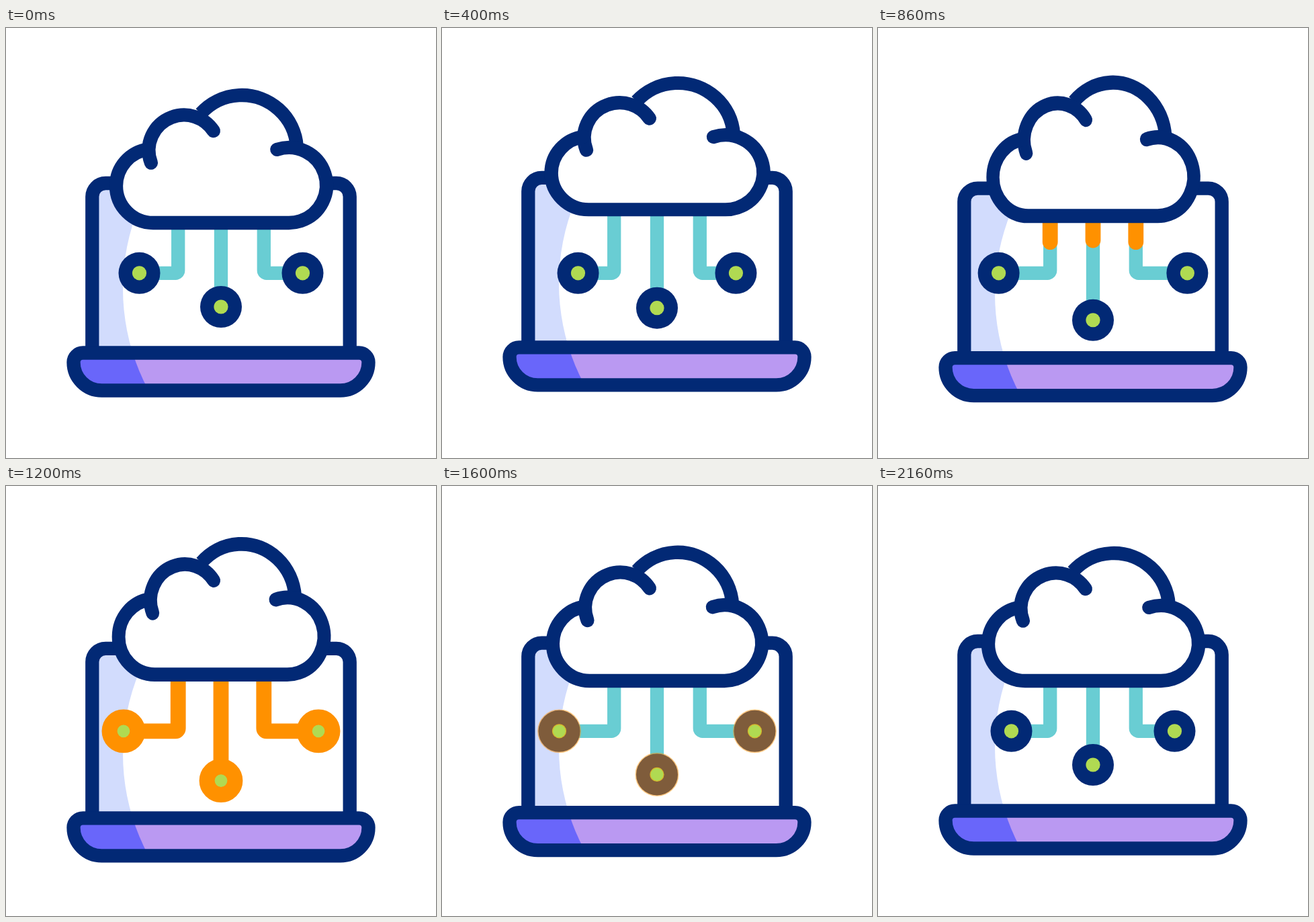
Animation, 640 px wide and 640 px high, one loop 2380 ms. Source, as an HTML page with a canvas:

```html
<!DOCTYPE html>
<html lang="en">
<head>
<meta charset="utf-8">
<title>Cloud laptop</title>
<style>
html, body { margin: 0; width: 100%; height: 100%; overflow: hidden; background: #fff; }
canvas { display: block; width: 100vmin; height: 100vmin; }
</style>
</head>
<body>
<canvas id="stage" width="640" height="640"></canvas>
<script>
const ctx = document.getElementById('stage').getContext('2d');
const LOOP = 2380;
const NAVY = '#022975', TEAL = '#69cdd3', ORANGE = '#ff9100', GREEN = '#b0da52';
const TAU = Math.PI * 2;

const linear = u => u;
const sine = u => (1 - Math.cos(Math.PI * u)) / 2;

// quick start, long settling
function settle(u) {
  let lo = 0, hi = 1;
  for (let i = 0; i < 24; i++) {
    const s = (lo + hi) / 2;
    if (0.75 * s * (1 - s) + s * s * s < u) lo = s; else hi = s;
  }
  const s = lo, r = 1 - s;
  return 0.3 * s * r * r + 3 * s * s * r + s * s * s;
}

// keys: [time, value, ease into this key]
function track(keys, t) {
  if (t <= keys[0][0]) return keys[0][1];
  for (let i = 1; i < keys.length; i++) {
    const [t0, v0] = keys[i - 1], [t1, v1, ease = sine] = keys[i];
    if (t < t1) return v0 + (v1 - v0) * ease((t - t0) / (t1 - t0));
  }
  return keys[keys.length - 1][1];
}

const LAPTOP_Y = [[0, 0], [250, -11.5], [1380, 11.2, settle], [1395, 11.2], [1890, -11.8], [2160, 0]];
const SIDE_X = [[0, 198.5], [200, 211], [1370, 174.5, settle], [1600, 174.5], [1900, 213.5], [2160, 198.5]];
const MID_Y = [[0, 415], [135, 406], [1385, 439, settle], [1440, 439], [1930, 399.5], [2160, 415]];
const CLOUD_Y = [[0, 0], [225, 0], [620, -45.5], [1010, 0], [1370, -21], [1630, 0]];
const CLOUD_SX = [[0, 1], [225, 1.047], [620, 0.955], [860, 0.955], [1200, 0.977, linear],
  [1600, 0.994, linear], [1660, 1, linear]];
const HEAD = [[740, 0], [1050, 1, linear]];
const TAIL = [[1250, 0], [1490, 1, linear]];
const GLOW = [[1020, 0], [1110, 1, linear], [1510, 1], [1690, 0, linear]];

function pen(color, width, cap = 'butt') {
  ctx.strokeStyle = color;
  ctx.lineWidth = width;
  ctx.lineCap = cap;
}

function disc(x, y, r, color) {
  ctx.fillStyle = color;
  ctx.beginPath();
  ctx.arc(x, y, r, 0, TAU);
  ctx.fill();
}

// fills a shape in two tones, parted by one large circle
function twoTone(path, left, right) {
  ctx.save();
  ctx.clip(path);
  ctx.fillStyle = left;
  ctx.fill(path);
  disc(494, 388, 320, right);
  ctx.restore();
}

const screen = new Path2D('M128.3 484 V251 A20 20 0 0 1 148.3 231 H491.7 A20 20 0 0 1 511.7 251 V484');
const base = new Path2D('M114.5 483.5 H525.5 A14 14 0 0 1 539.5 497.5 A42 42 0 0 1 497.5 539.5 ' +
  'H142.5 A42 42 0 0 1 100.5 497.5 A14 14 0 0 1 114.5 483.5 Z');

function laptop(dy) {
  ctx.save();
  ctx.translate(0, dy);
  pen(NAVY, 20.3);
  ctx.save();
  ctx.beginPath();
  ctx.rect(0, 0, 500, 640);
  ctx.clip();
  twoTone(screen, '#d2dcfd', '#fff');
  ctx.restore();
  ctx.stroke(screen);
  twoTone(base, '#6966fa', '#ba99f2');
  ctx.stroke(base);
  ctx.restore();
}

function wire(x, nodeX, nodeY) {
  const p = new Path2D();
  p.moveTo(x, 240);
  if (x === nodeX) p.lineTo(x, nodeY);
  else {
    p.arcTo(x, nodeY, nodeX, nodeY, 4);
    p.lineTo(nodeX, nodeY);
  }
  return { p, len: nodeY - 240 + Math.abs(nodeX - x) };
}

function link(x, nodeX, nodeY, t) {
  const { p, len } = wire(x, nodeX, nodeY);
  pen(TEAL, 20.3);
  ctx.stroke(p);

  const head = track(HEAD, t) * len, tail = track(TAIL, t) * len;
  if (head > tail) {
    ctx.save();
    pen(ORANGE, 22.8, 'round');
    ctx.setLineDash([head - tail, len * 2]);
    ctx.lineDashOffset = -tail;
    ctx.stroke(p);
    ctx.restore();
  }

  disc(nodeX, nodeY, 31, NAVY);
  disc(nodeX, nodeY, 10.6, GREEN);
  const glow = track(GLOW, t);
  if (glow > 0) {
    ctx.save();
    ctx.globalAlpha = glow;
    pen(ORANGE, 23);
    ctx.beginPath();
    ctx.arc(nodeX, nodeY, 20.9, 0, TAU);
    ctx.stroke();
    ctx.restore();
  }
}

const LOBES = [[219, 235, 55], [421, 234, 56], [265, 182, 52.5], [351, 182, 82]];

function lobe(i, x0, y0, x1, y1) {
  const [cx, cy, r] = LOBES[i];
  ctx.arc(cx, cy, r, Math.atan2(y0 - cy, x0 - cx), Math.atan2(y1 - cy, x1 - cx));
}

function cloud(dy, sx) {
  ctx.save();
  ctx.translate(320.3, 195 + dy);
  ctx.scale(sx, 2 - sx);
  ctx.translate(-320.3, -195);
  for (const [x, y, r] of LOBES) disc(x, y, r, '#fff');
  ctx.fillRect(219, 182, 202, 108);

  pen(NAVY, 20.3);
  ctx.beginPath();
  lobe(3, 290, 127, 433, 177);
  ctx.stroke();

  pen(NAVY, 20.3, 'round');
  ctx.beginPath();
  lobe(2, 215, 201, 309, 153);
  ctx.stroke();

  ctx.beginPath();
  const [cx, cy, r] = LOBES[1];
  ctx.arc(cx, cy, r, Math.atan2(180 - cy, 403 - cx), Math.PI / 2);
  lobe(0, 219, 290, 212, 180.5);
  ctx.stroke();
  ctx.restore();
}

function draw(t) {
  ctx.fillStyle = '#fff';
  ctx.fillRect(0, 0, 640, 640);
  laptop(track(LAPTOP_Y, t));
  const x = track(SIDE_X, t);
  link(256.2, x, 364.8, t);
  link(383.8, 640 - x, 364.8, t);
  link(320, 320, track(MID_Y, t), t);
  cloud(track(CLOUD_Y, t), track(CLOUD_SX, t));
}

const start = performance.now();
function tick() {
  draw((performance.now() - start) % LOOP);
  requestAnimationFrame(tick);
}
tick();
</script>
</body>
</html>
```
